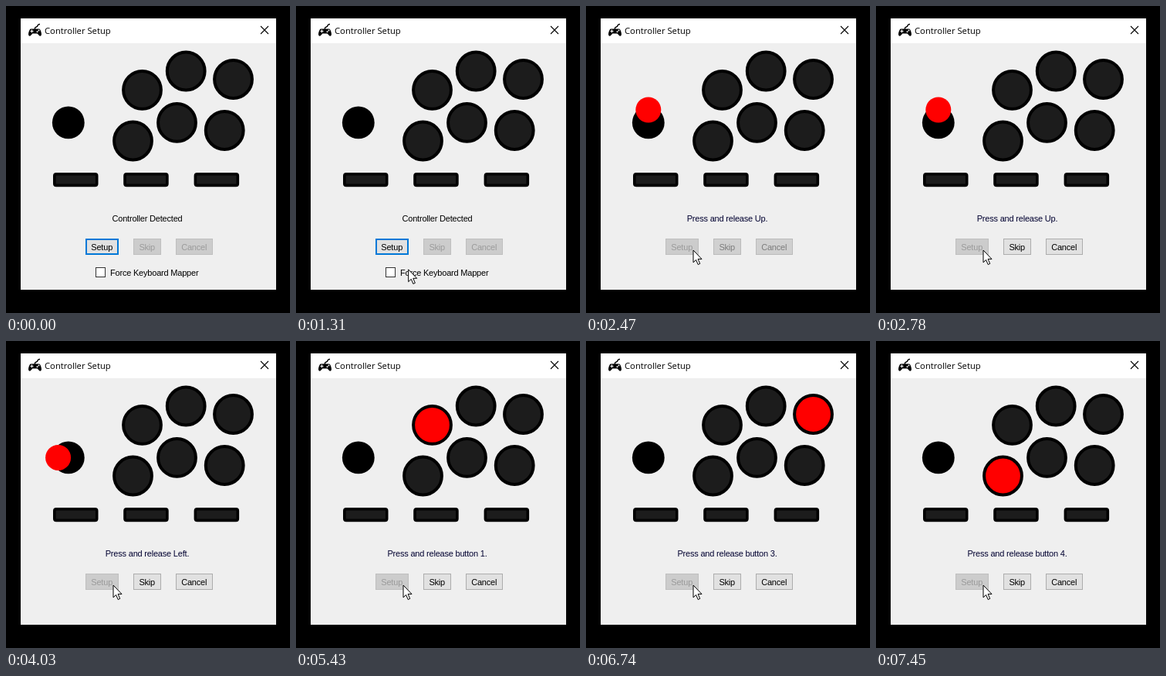
Write an HTML page that moves like this. It is 368x396 px and loops after 8000 ms.

```html
<!DOCTYPE html>
<html lang="en">
<head>
<meta charset="utf-8">
<title>Controller Setup</title>
<style>
  html, body { margin: 0; width: 100%; height: 100%; overflow: hidden; background: #000; }
  svg { display: block; }
  text { font: 11px "Liberation Sans", Arial, sans-serif; letter-spacing: -.2px; }
  .title { font: 11.25px "Open Sans", "Noto Sans", sans-serif; letter-spacing: 0; }
  .mid { text-anchor: middle; }
</style>
</head>
<body>
<svg width="368" height="396" viewBox="0 0 368 396">
  <rect width="368" height="396"/>
  <rect x="19" y="16" width="331" height="350" fill="#efefef"/>
  <rect x="19" y="16" width="331" height="32" fill="#fff"/>
  <g id="icon">
    <path d="M37.5 30C36.5 26 40.5 28 41 25.500Q41.300 23.500 44 23.500" fill="none" stroke="#000" stroke-width="1.300"/>
    <path d="M32 29.500H43Q45 30 46 36Q46 39.500 43.500 38.500L40.500 35.500H34.500L31.500 38.500Q29 39.500 29 36Q30 30 32 29.500Z"/>
    <path d="M31.500 32.500h4M33.500 30.500v4" stroke="#fff" stroke-width="1.100"/>
    <circle cx="40.500" cy="33.200" r="1" fill="#fff"/>
    <circle cx="42.500" cy="31.500" r="1" fill="#fff"/>
  </g>
  <text class="title" x="50" y="36">Controller Setup</text>
  <path d="M330 26l10 10m0-10l-10 10" stroke="#000" stroke-width="1.100"/>

  <circle cx="80.800" cy="150.400" r="20.900"/>
  <circle id="stick" r="16.500" fill="#f00"/>
  <g id="pads" stroke="#000" stroke-width="4"></g>
  <g id="bars" fill="#1c1c1c" stroke="#000" stroke-width="3.600"></g>

  <text id="label" class="mid" x="183" y="278"></text>
  <g id="buttons"></g>
  <g id="mapper">
    <rect x="116.500" y="337.500" width="12" height="12" fill="#fff" stroke="#333"/>
    <text x="135" y="348">Force Keyboard Mapper</text>
  </g>
  <circle id="glow" cx="138" cy="316" r="12" fill="#f4f800" opacity=".55"/>
  <path id="cursor" d="M0 0V15.800L3.600 12.400L6.200 18.500L8.700 17.400L6.100 11.400H11Z" fill="#fff" stroke="#000"/>
</svg>
<script>
const LOOP = 8000, CLICK = 1770, RELEASE = 1920, READY = 2470;
const $ = id => document.getElementById(id);
const clamp = v => Math.max(0, Math.min(1, v));
const lerp = (a, b, u) => a + (b - a) * u;
const mix = (a, b, u) => `rgb(${a.map((v, i) => Math.round(lerp(v, b[i], u)))})`;
const gray = v => [v, v, v];

function add(parent, tag, attrs) {
  const el = document.createElementNS("http://www.w3.org/2000/svg", tag);
  set(el, attrs);
  return parent.appendChild(el);
}
function set(el, attrs) {
  for (const k in attrs) el.setAttribute(k, attrs[k]);
}
const show = (el, on) => set(el, { visibility: on ? "visible" : "hidden" });

const pads = [[176.5, 108.3], [233.2, 84], [294.5, 94.5], [164.5, 174], [221.5, 150.4], [283.2, 160.5]]
  .map(([cx, cy]) => add($("pads"), "circle", { cx, cy, r: 24.4 }));
for (const x of [61, 152.2, 243.6])
  add($("bars"), "rect", { x: x + 1.8, y: 216.8, width: 54.9, height: 14.6, rx: 2.2 });

const [setup, skip, cancel] = [["Setup", 103, 43], ["Skip", 165, 36], ["Cancel", 220, 48]].map(([name, x, w]) => {
  const box = add($("buttons"), "rect", {});
  const text = add($("buttons"), "text", { class: "mid", x: x + w / 2 - .3, y: 315 });
  text.textContent = name;
  return { box, text, x, w };
});

function paint({ box, text, x, w }, fill, stroke, ink, line = 1) {
  set(box, {
    x: x + line / 2, y: 300 + line / 2, width: w - line, height: 21 - line,
    fill, stroke, "stroke-width": line
  });
  set(text, { fill: ink });
}
// on = 0: disabled, on = 1: enabled
const paintState = (button, on) =>
  paint(button, mix(gray(204), gray(225), on), mix(gray(191), gray(173), on), mix(gray(155), gray(0), on));

// Each prompt: start time, name, then a stick offset or a pad index
const prompts = [
  [RELEASE, "Up", [0, -16.4]], [3330, "Down", [0, 16.4]],
  [4030, "Left", [-13.2, 0]], [4730, "Right", [13.2, 0]],
  [5430, "button 1", 0], [6130, "button 2", 1], [6740, "button 3", 2], [7450, "button 4", 3]
];

function draw(t) {
  const prompt = prompts.findLast(p => t >= p[0]);
  const lit = prompt && t >= READY ? prompt[2] : null;

  $("label").textContent = prompt ? `Press and release ${prompt[1]}.` : "Controller Detected";
  set($("label"), { fill: prompt ? "#000030" : "#000" });

  const tilted = Array.isArray(lit);
  show($("stick"), tilted);
  if (tilted) set($("stick"), { cx: 80.8 + lit[0], cy: 150.4 + lit[1] });
  pads.forEach((pad, i) => set(pad, { fill: i === lit ? "#f00" : "#1c1c1c" }));

  // The pointer enters in seven steps
  const step = Math.min(6, Math.floor((t - 1140) / 76.6));
  const u = 1 - (1 - clamp(step / 6)) ** 2;
  show($("cursor"), step >= 0);
  set($("cursor"), { transform: `translate(${lerp(154, 139, u)} ${lerp(371, 315, u)})` });
  show($("glow"), t >= CLICK && t < RELEASE);
  show($("mapper"), t < RELEASE);

  const fade = t < READY ? 0 : clamp((Math.floor((t - READY) / 77) + 1) / 5);
  paintState(skip, fade);
  paintState(cancel, fade);
  if (t >= RELEASE) {
    paintState(setup, 0);
  } else if (t >= CLICK) {
    paint(setup, "#cce4f7", "#005499", "#000");
  } else {
    const hover = clamp((step - 3) / 3);
    paint(setup, mix(gray(225), [229, 241, 251], hover), "#0078d7", "#000", 2 - hover);
  }
}

function frame() {
  draw(performance.now() % LOOP);
  requestAnimationFrame(frame);
}
frame();
</script>
</body>
</html>
```
